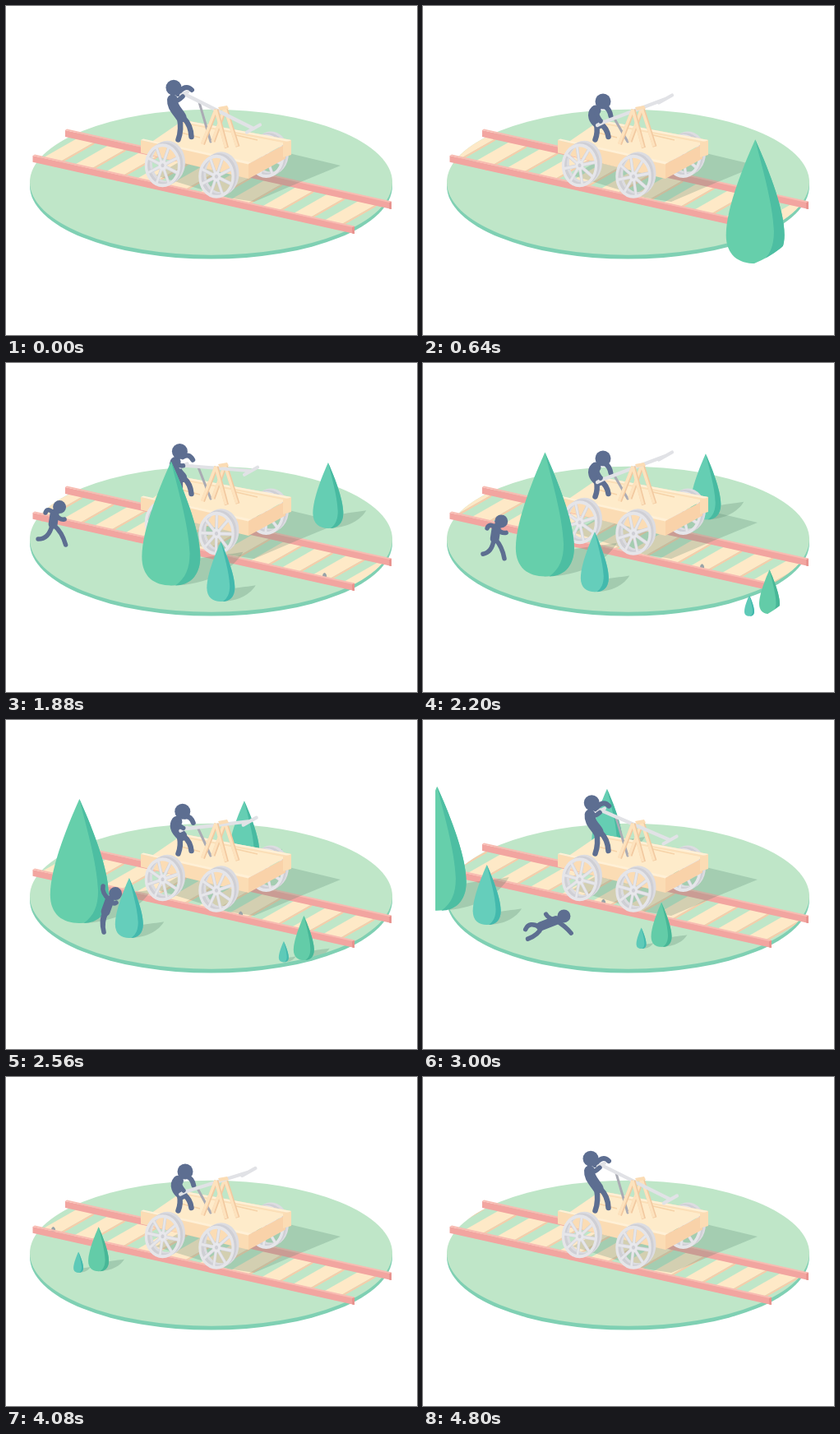
Animation of 500 by 400 pixels, one loop 4840 ms. Source, as an HTML page:

```html
<!DOCTYPE html>
<html lang="en">
<head>
<meta charset="utf-8">
<title>Handcar</title>
<style>
html, body { margin: 0; width: 100%; height: 100%; overflow: hidden; background: #fff; }
svg { display: block; width: 100vw; height: 100vh; }
.limb { fill: none; stroke: #5d6e91; stroke-linecap: round; stroke-linejoin: round; }
</style>
</head>
<body>
<svg viewBox="0 0 500 400" xmlns="http://www.w3.org/2000/svg">
  <defs>
    <clipPath id="disc"><ellipse cx="249.5" cy="214.5" rx="220.5" ry="88.5"/></clipPath>
    <clipPath id="near"><path d="M15 40H485V210Q465 292 395 316H15Z"/></clipPath>
    <clipPath id="far"><path d="M483 225Q488 185 474 156Q440 90 300 60Q200 68 165 84Q115 108 85 150V230Z"/></clipPath>
    <g id="tie">
      <path d="M0 0L-21 -4.500L-71 24L-50 28.500Z" fill="#fee9c7"/>
      <path d="M0 0L-50 28.500V31L0 2.500Z" fill="#f6cdaa"/>
    </g>
    <g id="rim">
      <circle r="24.500" fill="none" stroke-width="4"/>
    </g>
  </defs>

  <ellipse cx="249.5" cy="218.8" rx="220.5" ry="88.8" fill="#7fd0b3"/>
  <ellipse cx="249.5" cy="214.3" rx="220.5" ry="88.5" fill="#bfe6c8"/>
  <g clip-path="url(#disc)"><g id="ties"></g></g>

  <path d="M72 151L469 239V247L72 159Z" fill="#f2a5a0"/>
  <path d="M72 151L74 149.500L469 237.500V239.500Z" fill="#f8bcb2"/>
  <path d="M466 239L469 238V247L466 246.500Z" fill="#e8938f"/>
  <path d="M182 206L210 190L340 178L407 194L356 215L302 238L270 233Z" fill="#57826f" opacity=".26"/>
  <path id="stone" d="M-2 3Q-2 -3 1 -3Q4 -1 3 3Z" fill="#99a3a8"/>
  <path d="M32.500 182L424 269V277L32.500 189.800Z" fill="#f2a5a0"/>
  <path d="M32.500 182L35 180.500L424 267.500V269.500Z" fill="#f8bcb2"/>
  <path d="M421 269L424 268V277L421 276.500Z" fill="#e8938f"/>

  <g clip-path="url(#disc)" id="shades" fill="#57826f" opacity=".27"></g>
  <g clip-path="url(#far)" id="back"></g>

  <g id="wheel2"></g>
  <path d="M176 166L214 140L346 164L295 192Z" fill="#feebca"/>
  <path d="M212 138L347 163V168L210 142Z" fill="#fbdfb8"/>
  <path d="M212 138L347 163L344 165L210 140Z" fill="#fff0d6"/>
  <path d="M164 163L295 191.500V210L164 178.500Z" fill="#fbdcb4"/>
  <path d="M164 163L167 161.500L298 190L295 192.500Z" fill="#fff0d6"/>
  <path d="M295 192L340 168V185.500L295 210Z" fill="#f9d2a9"/>
  <path d="M337 166L347 163.500V181L337 184Z" fill="#fbdcb4"/>
  <path d="M213 154L236 160M280 157L306 163" stroke="#f6d3a8" stroke-width="1.500" fill="none"/>
  <g id="wheel0"></g>
  <g id="wheel1"></g>

  <line id="rod" stroke="#aaabb4" stroke-width="3" stroke-linecap="round"/>
  <g fill="none" stroke="#f2c9a0" stroke-width="5">
    <path d="M267 124L252 165M267 124L282 171"/>
    <path d="M266 124L251 165M266 124L281 170.500" stroke="#fde2bd" stroke-width="3.500"/>
  </g>
  <path id="armFar" class="limb" stroke-width="6"/>
  <path id="torso" class="limb" stroke-width="13"/>
  <path id="legs" class="limb" stroke-width="6.500"/>
  <circle id="head" r="9.500" fill="#5d6e91"/>
  <path id="lever" fill="none" stroke="#e1e2e6" stroke-width="4.200" stroke-linecap="round"/>
  <path id="armNear" class="limb" stroke-width="5.500"/>
  <g fill="none" stroke="#f2c9a0" stroke-width="5">
    <path d="M256 126L239.500 168M256 126L268.500 172.500"/>
    <path d="M255 126L238.500 168M255 126L267.500 172" stroke="#fde2bd" stroke-width="3.500"/>
  </g>
  <path d="M258 123L269 121L271 125L260 127Z" fill="#fbdcb4"/>

  <g clip-path="url(#near)">
    <g id="front"></g>
    <g id="runner">
      <path id="rTorso" class="limb" stroke-width="11"/>
      <path id="rLimbs" class="limb" stroke-width="5.500"/>
      <circle id="rHead" r="8" fill="#5d6e91"/>
    </g>
    <g id="front2"></g>
  </g>
</svg>
<script>
const LOOP = 4840, TIES = 19, GAP = 38.1, SLOPE = 0.221;
const $ = id => document.getElementById(id);
const set = (id, name, value) => $(id).setAttribute(name, value);
const clamp = v => Math.max(0, Math.min(1, v));
const ramp = (t, a, b) => clamp((t - a) / (b - a));
const smooth = u => (1 - Math.cos(Math.PI * u)) / 2;
const mix = (a, b, u) => a + (b - a) * u;
const mixAll = (a, b, u) => a.map((v, i) => mix(v, b[i], u));
const add = (parent, markup) => {
  $(parent).insertAdjacentHTML('beforeend', markup);
  return $(parent).lastElementChild;
};

// Trees: tip position at time `at`, half width, height, speed and two tones
const trees = [
  { layer: 'back', at: 1880, x: 392, y: 121, w: 18.5, h: 80, vx: .15, vy: .0333, tones: ['#65ceb3', '#48baa1'] },
  { layer: 'front', at: 1880, x: 201, y: 119.5, w: 35.5, h: 151, vx: .164, vy: .0345, tones: ['#66cfab', '#4dbea2'] },
  { layer: 'front2', at: 1880, x: 261.5, y: 217, w: 17, h: 73, vx: .164, vy: .0366, tones: ['#65cebb', '#43b9ad'] },
  { layer: 'front2', at: 2560, x: 338, y: 269, w: 6, h: 25.5, vx: .1643, vy: .0372, tones: ['#5ecab8', '#43b9ad'] },
  { layer: 'front2', at: 2560, x: 362.5, y: 238, w: 12.5, h: 54, vx: .1643, vy: .0367, tones: ['#63cca8', '#47b797'] }
];

// Letters stand alone, number pairs scale with the tree
function path(parts, w, h) {
  return parts.map(p => typeof p === 'string' ? p : p.map((v, i) => v * (i % 2 ? h : w)).join(' ')).join('');
}

for (const tree of trees) {
  const { w, h, tones } = tree;
  const body = path(['M', [0, 0], 'C', [.32, .17, 1, .54, 1, .77], 'C', [1, .93, .58, 1, 0, 1],
    'C', [-.58, 1, -1, .93, -1, .77], 'C', [-1, .54, -.32, .17, 0, 0], 'Z'], w, h);
  const side = path(['M', [0, 0], 'C', [.32, .17, 1, .54, 1, .77], 'C', [1, .93, .6, 1, .15, 1],
    'C', [.5, .94, .64, .86, .64, .74], 'C', [.6, .5, .2, .2, 0, 0], 'Z'], w, h);
  tree.node = add(tree.layer, `<g><path d="${body}" fill="${tones[0]}"/><path d="${side}" fill="${tones[1]}"/></g>`);
  tree.shade = add('shades', `<path d="M${-.5 * w} ${.96 * h}C${.1 * w} ${.76 * h} ${.38 * h} ${.77 * h} ${.58 * h} ${.73 * h}` +
    `C${.5 * h} ${.87 * h} ${.3 * h} ${h} 0 ${h}Z"/>`);
}

const ties = [];
for (let i = 0; i < 14; i++) ties.push(add('ties', '<use href="#tie"/>'));

// Wheels
const hubs = [[190.5, 193.8], [256, 207.3], [316.5, 182.5]];
const spokes = Array.from({ length: 8 }, (_, i) => {
  const a = i * Math.PI / 4;
  return `M0 0L${(23 * Math.cos(a)).toFixed(2)} ${(23 * Math.sin(a)).toFixed(2)}`;
}).join('');
hubs.forEach(([x, y], i) => add('wheel' + i,
  `<g transform="translate(${x} ${y}) scale(.82 1)">
    <use href="#rim" stroke="#dcdce1" x="7" y="-3.500"/>
    <use href="#rim" stroke="#cfcfd5" x="3.500" y="-1.700"/>
    <g id="spin${i}"><path d="${spokes}" stroke="#d2d2d8" stroke-width="4.500"/><path d="${spokes}" stroke="#e6e6ea" stroke-width="3.200"/></g>
    <use href="#rim" stroke="#e5e5e9"/>
    <circle r="6" fill="#e8e8ec"/><circle r="2.500" fill="#cfcfd5"/></g>`));

function drawDriver(t) {
  const q = t * 3 / LOOP % 1;
  const up = ramp(q, .513, 1);
  const p = q < .513 ? smooth(ramp(q, 0, .335)) : (1 - up) ** 2;
  const at = (x0, y0, x1, y1) => `${mix(x0, x1, p).toFixed(2)} ${mix(y0, y1, p).toFixed(2)} `;

  const left = [mix(216, 215, p), mix(106.5, 143, p)];
  const right = [mix(301, 295, p), mix(149, 113, p)];
  const joint = mixAll(left, right, .22);
  set('lever', 'd', `M${left}L${right}M${left}m-3 2l8 -4M${right}m-8 4.500l16 -9`);
  set('rod', 'x1', joint[0]);
  set('rod', 'y1', joint[1]);
  set('rod', 'x2', 249);
  set('rod', 'y2', 165);

  set('head', 'cx', mix(204, 219, p));
  set('head', 'cy', mix(99.3, 116, p));
  set('torso', 'd', 'M' + at(202.500, 114, 210, 127) + 'C' + at(202, 122, 205, 132) +
    at(207, 126, 208, 139) + at(213, 135, 214, 143));
  set('legs', 'd', 'M' + at(211, 136, 211, 144) + 'Q' + at(214, 150, 213, 154) + '209.5 162.5' +
    'M' + at(216, 136, 217, 144) + 'Q' + at(225, 145, 224, 149) + '225.5 159');
  set('armFar', 'd', 'M' + at(209, 107, 221, 122) + 'Q' + at(218, 94, 227, 125) + at(226, 102, 228.5, 134));
  set('armNear', 'd', 'M' + at(205, 116, 211, 130) + 'Q' + at(210, 115, 213, 136) + at(215, 110, 216, 140));
}

// Poses from the hip: head, shoulder, elbow, hand, elbow, hand, then knee and foot twice
const running = [8, -22, 2, -14, -7, -22, -9, -15, 8, -6, 14, -7, -5, 17, -18, 17, 11, 8, 15.5, 24];
const stumbling = [12, -23, 5, -15, -5, -24, -3, -32, 9, -9, 13, -12, -6, 9, -2, 24, -5, 12, -2, 24];
const lying = [29, -13, 19, -8, 10, -10, 7, -15, 31, -1, 38, 8, -14, -8, -19, 2, -2, 9, -16, 14];

function drawRunner(t) {
  const shown = t > 1400 && t < 4040;
  set('runner', 'visibility', shown ? 'visible' : 'hidden');
  if (!shown) return;
  const swap = (1 - Math.cos((t - 1880) * Math.PI * 2 / 360)) / 2;
  const r = running;
  const other = [...r.slice(0, 4), -5, -9, -10, -3, 7, -13, 13, -17, ...r.slice(16), ...r.slice(12, 16)];
  let pose = mixAll(r, other, swap);
  pose = mixAll(pose, stumbling, smooth(ramp(t, 2320, 2560)));
  pose = mixAll(pose, lying, smooth(ramp(t, 2720, 3040)));
  let x, y;
  if (t < 2560) {
    x = 57 + (t - 1880) * .0941;
    y = 197 + (t - 1880) * .0544;
  } else if (t < 3040) {
    const u = (t - 2560) / 480;
    x = mix(121, 145, u);
    y = mix(234, 253.4, u);
  } else {
    x = 80 - (t - 3440) * .1625;
    y = 239 - (t - 3440) * .036;
  }
  set('runner', 'transform', `translate(${x} ${y})`);
  const pt = i => `${pose[i * 2].toFixed(2)} ${pose[i * 2 + 1].toFixed(2)} `;
  set('rHead', 'cx', pose[0]);
  set('rHead', 'cy', pose[1]);
  set('rTorso', 'd', `M${pt(1)}L0 -1`);
  set('rLimbs', 'd', `M${pt(1)}Q${pt(2)}${pt(3)}M${pt(1)}Q${pt(4)}${pt(5)}M-1 0Q${pt(6)}${pt(7)}M1 0Q${pt(8)}${pt(9)}`);
}

function draw(t) {
  const shift = t * TIES / LOOP % 1;
  ties.forEach((tie, i) => {
    const x = 69.5 + (i - shift) * GAP;
    tie.setAttribute('transform', `translate(${x} ${174 + (x - 145.7) * SLOPE})`);
  });
  for (const tree of trees) {
    const dt = t - tree.at;
    const place = `translate(${tree.x - tree.vx * dt} ${tree.y - tree.vy * dt})`;
    tree.node.setAttribute('transform', place);
    tree.shade.setAttribute('transform', place);
  }
  const sx = 387 - (t - 1880) * .15;
  set('stone', 'transform', `translate(${sx} ${258 + (sx - 387) * SLOPE})`);
  set('stone', 'visibility', sx > 38 && sx < 430 ? 'visible' : 'hidden');
  hubs.forEach((_, i) => set('spin' + i, 'transform', `rotate(${t / LOOP * 1800 + 22})`));
  drawDriver(t);
  drawRunner(t);
}

const start = performance.now();
function tick(now) {
  draw(Math.max(0, now - start) % LOOP);
  requestAnimationFrame(tick);
}
draw(0);
requestAnimationFrame(tick);
</script>
</body>
</html>
```
